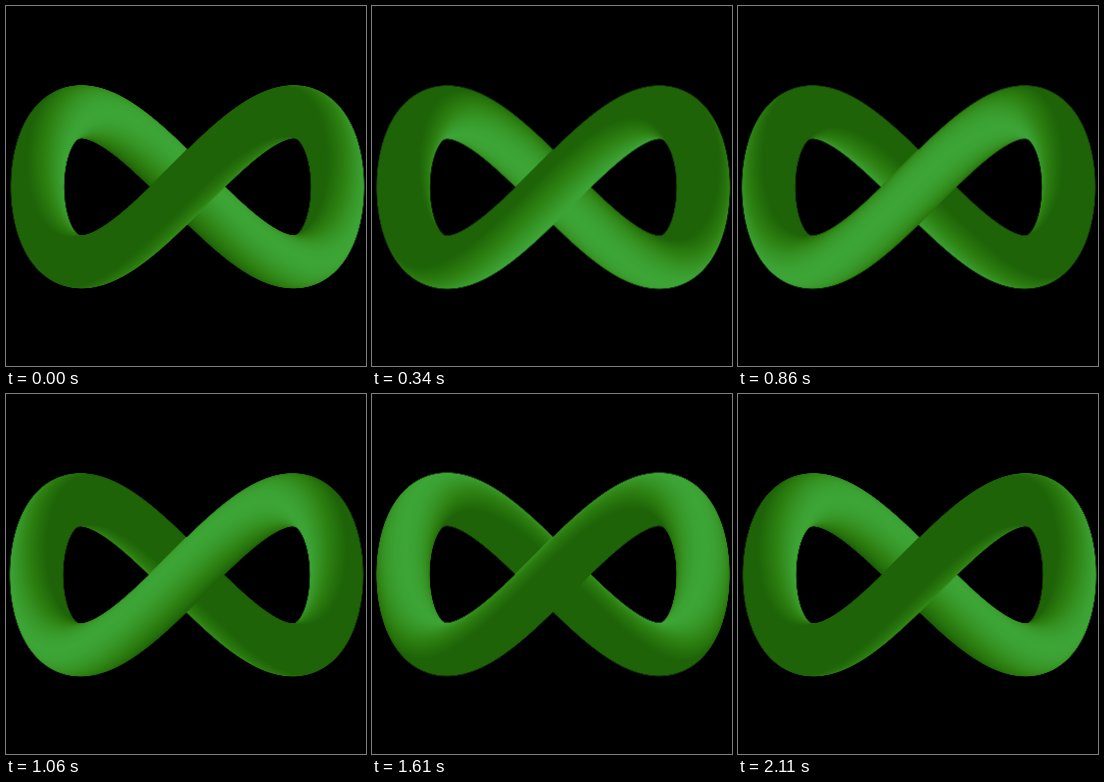
An HTML page with a canvas for the animation above (2130 ms loop, 360 px wide and 360 px high).

```html
<!DOCTYPE html>
<html lang="en">
<head>
<meta charset="utf-8">
<title>Infinity loop</title>
<style>
html, body { margin: 0; width: 100%; height: 100%; overflow: hidden; background: #000; }
canvas { display: block; }
</style>
</head>
<body>
<canvas id="stage" width="360" height="360"></canvas>
<script>
const SIZE = 360, LOOP = 2130, TAU = Math.PI * 2;
const CX = 181, CY = 180.8, AX = 150, AY = 75, R = 26.4;
const SHADES = 1024;

const ctx = document.getElementById("stage").getContext("2d");
const layer = document.createElement("canvas");
layer.width = layer.height = SIZE;
const layerCtx = layer.getContext("2d");
const image = layerCtx.createImageData(SIZE, SIZE);

const facing = new Float32Array(SIZE * SIZE);
const nearest = new Float32Array(SIZE * SIZE).fill(1e3);

// Sweep a disc along the figure eight, from the right bend downwards.
// Each pixel keeps the rim angle of the last disc over it.
function sweep(from, to, minX) {
  const reach = R + 0.5;
  for (let s = from; s <= to; s += 0.0012) {
    const x = CX + AX * Math.cos(s), y = CY + AY * Math.sin(2 * s);
    const left = Math.max(minX, Math.floor(x - reach));
    for (let py = Math.floor(y - reach); py <= y + reach; py++) {
      for (let px = left; px <= x + reach; px++) {
        const dx = px + 0.5 - x, dy = py + 0.5 - y, d = Math.hypot(dx, dy);
        if (d > reach) continue;
        const i = py * SIZE + px;
        facing[i] = Math.atan2(dy, dx);
        if (d < nearest[i]) nearest[i] = d;
      }
    }
  }
}
sweep(0, TAU, 0);
sweep(0, Math.PI / 2 - 0.3, 262); // hides the seam on the right bend

const tube = [];
facing.forEach((angle, i) => {
  if (nearest[i] > R + 0.5) return;
  tube.push({ i: i * 4, shade: Math.round((angle / TAU + 1) * SHADES) });
  image.data[i * 4 + 3] = 255 * Math.min(1, 2 * (R + 0.5 - nearest[i]));
});

const STOPS = [
  [-0.4, 30, 99, 8],
  [0.3, 46, 129, 18],
  [1, 60, 165, 54]
];
function shadeOf(c) {
  if (c <= STOPS[0][0]) return STOPS[0].slice(1);
  const k = c < STOPS[1][0] ? 0 : 1;
  const a = STOPS[k], b = STOPS[k + 1];
  const u = (c - a[0]) / (b[0] - a[0]);
  return [1, 2, 3].map(n => a[n] + (b[n] - a[n]) * u);
}
const ramp = Array.from({ length: SHADES }, (_, n) => shadeOf(Math.cos(n / SHADES * TAU)));

// The light circles the figure once per loop.
function draw(now) {
  const turn = (now % LOOP) / LOOP;
  const shift = Math.round(turn * SHADES);
  const data = image.data;
  for (const p of tube) {
    const c = ramp[(p.shade - shift + SHADES) % SHADES];
    data[p.i] = c[0];
    data[p.i + 1] = c[1];
    data[p.i + 2] = c[2];
  }
  layerCtx.putImageData(image, 0, 0);
  ctx.fillStyle = "#000";
  ctx.fillRect(0, 0, SIZE, SIZE);
  ctx.drawImage(layer, 0.5 * Math.cos(turn * TAU), 0.5 * Math.sin(turn * TAU));
}

let start = null;
function tick(now) {
  if (start === null) start = now;
  draw(now - start);
  requestAnimationFrame(tick);
}
draw(0);
requestAnimationFrame(tick);
</script>
</body>
</html>
```
